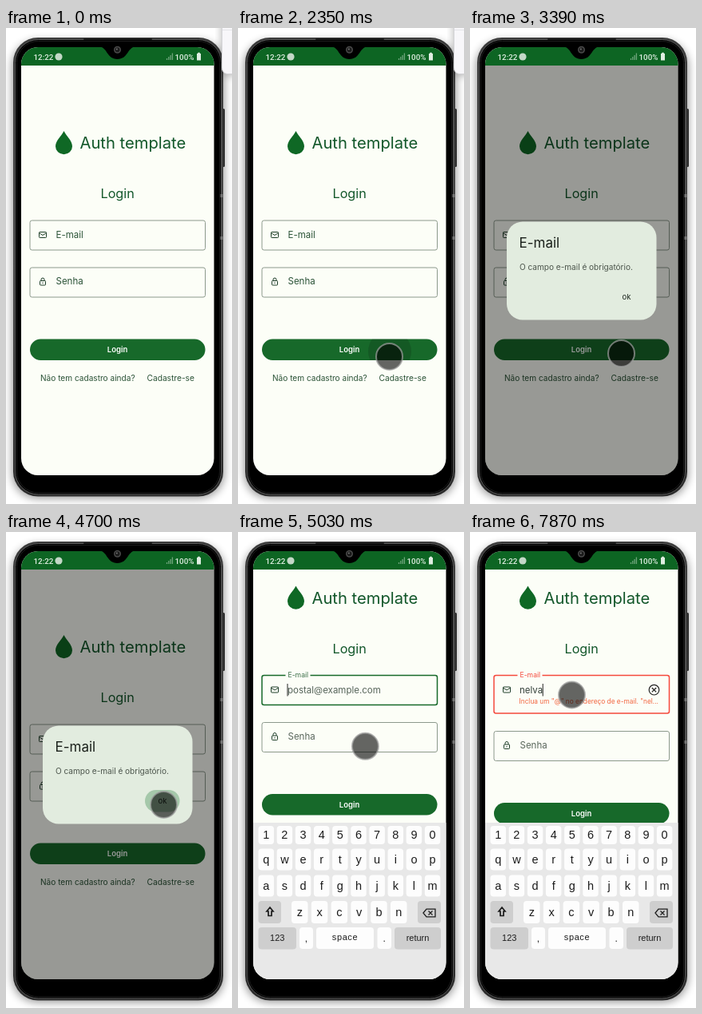
Recreate the animation shown at these times as an HTML page. Size 283 px wide and 596 px high, loop 8 s.

```html
<!DOCTYPE html>
<html lang="pt">
<head>
<meta charset="utf-8">
<title>Auth template</title>
<style>
html, body { margin: 0; width: 100%; height: 100%; overflow: hidden; background: #fff; }
svg { display: block; }
text { font-family: Inter, "Open Sans", sans-serif; fill: #2b5337; white-space: pre; }
.head { fill: #12572a; }
.bar text { font-family: Roboto, sans-serif; font-size: 9.8px; font-weight: 500; fill: #e2f0e5; }
#keys text { font-family: "Liberation Sans", Arial, sans-serif; fill: #1c1c1c; text-anchor: middle; }
.box { fill: none; stroke: #8c998c; }
.line { fill: none; stroke: #1f3f2a; }
</style>
</head>
<body>
<svg width="283" height="596" viewBox="0 0 283 596">
  <defs>
    <clipPath id="screen"><rect x="19" y="24" width="241.500" height="536" rx="21"/></clipPath>
    <clipPath id="pill"><rect x="30" y="389.500" width="219.500" height="26.500" rx="13.250"/></clipPath>
    <filter id="blur" x="-20%" y="-20%" width="140%" height="140%"><feGaussianBlur stdDeviation="5.500"/></filter>
    <linearGradient id="metal" x2="0" y2="1">
      <stop offset="0" stop-color="#3a3a3a"/><stop offset=".5" stop-color="#4a4a4a"/><stop offset="1" stop-color="#2a2a2a"/>
    </linearGradient>
  </defs>

  <!-- phone body -->
  <rect x="7.500" y="16" width="266" height="573" rx="32" fill="#000" opacity=".4" filter="url(#blur)"/>
  <rect x="270" y="101" width="4" height="73" rx="1.500" fill="#2c2c2c"/>
  <rect x="9" y="12" width="263" height="574.500" rx="31" fill="url(#metal)"/>
  <rect x="11.500" y="14.500" width="258" height="569.500" rx="29" fill="#000" stroke="#666" stroke-width=".8"/>
  <rect x="13.500" y="16.500" width="254" height="565.500" rx="27" fill="#000" stroke="#1d1d1d"/>
  <rect x="97" y="13" width="86" height="2" rx="1" fill="#1a1a1a"/>
  <path d="M270 208v4M270 261v4" stroke="#777" stroke-width="3"/>

  <g clip-path="url(#screen)">
    <rect x="19" y="24" width="242" height="536" fill="#fcfef7"/>
    <g id="page">
      <path d="M72.500 129C76 136 83 141 83 148.300A10.500 9.900 0 0 1 62 148.300C62 141 69 136 72.500 129Z" fill="#0f6825"/>
      <text class="head" x="92.500" y="151" font-size="20.200">Auth template</text>
      <text class="head" x="118.500" y="213" font-size="16.200">Login</text>

      <rect id="email" class="box" x="30" y="241" width="219.500" height="37" rx="2.500"/>
      <g class="line"><rect x="41.500" y="255.500" width="9" height="7" rx=".8"/><path d="M41.500 256.500l4.500 3 4.500-3"/></g>
      <rect id="gap" x="59.500" y="239" width="31" height="4" fill="#fcfef7"/>
      <text id="label" x="62.500">E-mail</text>
      <text id="hint" x="62" y="263" font-size="11.500" style="fill:#56645a">postal@example.com</text>
      <text id="typed" x="62" y="263" font-size="11.500" style="fill:#33403a"></text>
      <rect id="caret" y="251.500" width="1" height="15.500" fill="#222"/>
      <text id="error" x="61.500" y="276" font-size="8.300" style="fill:#f2643f">Inclua um "@" no endereço de e-mail. "nel...</text>
      <g id="clear" fill="none" stroke="#222" stroke-width="1.200">
        <circle cx="230.500" cy="259.200" r="6.300"/><path d="M227.800 256.500l5.400 5.400M233.200 256.500l-5.400 5.400"/>
      </g>

      <g id="lower">
        <rect class="box" x="30" y="300" width="219.500" height="37" rx="2.500"/>
        <g class="line"><rect x="42.500" y="316.500" width="7" height="5.500" rx=".8"/><path d="M44 316.500v-1.500a2 2 0 0 1 4 0v1.500M46 318.500v1.500"/></g>
        <text id="senha" x="62.500" y="321" font-size="11.500">Senha</text>
        <g clip-path="url(#pill)">
          <rect x="30" y="389" width="220" height="28" fill="#17692a"/>
          <circle id="ripple" cx="190" cy="405" fill="#000"/>
        </g>
        <text x="139.500" y="406" font-size="9.500" font-weight="600" text-anchor="middle" style="fill:#fff">Login</text>
        <text x="43" y="442" font-size="10.100">Não tem cadastro ainda?</text>
        <text x="176.500" y="442" font-size="10.200">Cadastre-se</text>
      </g>
    </g>

    <g id="keys"><rect x="19" y="364" width="242" height="196" fill="#e8e8e8"/></g>

    <rect id="dim" x="19" y="47" width="242" height="513" fill="#000"/>
    <g id="dialog">
      <rect x="46" y="242.500" width="187.500" height="123" rx="20" fill="#e2ecdf"/>
      <text x="61.500" y="275" font-size="17" style="fill:#1b211b">E-mail</text>
      <text x="62" y="303" font-size="10.050" style="fill:#4c554c">O campo e-mail é obrigatório.</text>
      <rect id="press" x="174" y="323" width="43.500" height="27.500" rx="13.700" fill="#a5c8aa"/>
      <text x="190.500" y="339.500" font-size="9.600" style="fill:#1e2a20">ok</text>
    </g>

    <g class="bar">
      <rect x="19" y="24" width="242" height="23" fill="#0d6523"/>
      <text x="34.500" y="40">12:22</text>
      <circle cx="66" cy="36" r="4.600" fill="#c3d8c7"/>
      <path d="M201.500 40v-2M203.800 40v-4M206.100 40v-6M208.400 40v-8.500" stroke="#6fa57c" stroke-width="1.300"/>
      <text x="211.500" y="40">100%</text>
      <path d="M239 32h1.200v-1.200h2.600V32H244v8.500h-5Z" fill="#dfeee2"/>
    </g>
  </g>

  <path d="M117 23.500C127 24 126 39 139.500 39S152 24 162 23.500Z" fill="#000"/>
  <circle cx="139.500" cy="27.300" r="4.500" fill="#4b4b4b"/>
  <circle cx="139.500" cy="27.300" r="3" fill="#1b1b1b"/>
  <circle cx="138.800" cy="26.500" r="1" fill="#777"/>

  <g id="panel">
    <rect x="270" y="-20" width="40" height="79" rx="8" fill="#000" opacity=".3" filter="url(#blur)"/>
    <rect x="270.500" y="-20" width="40" height="77.500" rx="7" fill="#f8f7fa" stroke="#d3d3d6"/>
    <path d="M271 2.500h12" stroke="#e4e4e8"/>
  </g>

  <circle id="touch" r="16.500" fill="#000" fill-opacity=".6" stroke="#a0a0a0" stroke-opacity=".7" stroke-width="2"/>
</svg>
<script>
const LOOP = 8000;
const NS = "http://www.w3.org/2000/svg";
const $ = id => document.getElementById(id);
const set = (id, attrs) => { for (const k in attrs) $(id).setAttribute(k, attrs[k]); };
const show = (id, on) => set(id, { opacity: +on });
const mix = (a, b, p) => a + (b - a) * p;

// Each row is [time, value, ...]; values are linear between rows.
function at(rows, t) {
  const i = rows.findIndex(r => r[0] > t);
  if (i < 0) return rows[rows.length - 1].slice(1);
  if (i === 0) return rows[0].slice(1);
  const a = rows[i - 1], b = rows[i];
  const p = (t - a[0]) / (b[0] - a[0]);
  return a.slice(1).map((v, k) => mix(v, b[k + 1], p));
}

const path = [
  [970, 235, 401], [1230, 170, 330], [1440, 133.5, 284.5], [1570, 95, 242], [1700, 127, 260],
  [1950, 127, 260], [2080, 150, 330], [2220, 182, 416], [2350, 189.5, 411.5], [2470, 189.5, 407.5],
  [3590, 189.5, 407.5], [3790, 160, 423], [3920, 145, 405], [4100, 168, 368], [4300, 197.5, 341.5],
  [4770, 197.5, 341.5], [5030, 159.5, 268.5], [5290, 128, 205], [5420, 127.5, 204]
];
const modal = [[2720, 0], [2860, .3], [3030, .3], [3390, 1], [4730, 1], [4900, .2], [5030, 0]];
const lift = [[4830, 0], [5000, 1]];
const grow = [[5980, 0], [6130, .15], [6400, 1]];
const ripple = [[2280, 0, .15], [2350, 27, .15], [2720, 27, .15], [2860, 27, 0]];
const press = [[4560, 0], [4640, 1]];
const typing = [[5850, 1], [5980, 2], [6130, 3], [6400, 4], [6820, 5]];
const word = "nelva";

function add(tag, attrs, label = "") {
  const el = document.createElementNS(NS, tag);
  for (const k in attrs) el.setAttribute(k, attrs[k]);
  el.textContent = label;
  $("keys").append(el);
}

function key(x, y, w, h, label, size, dark) {
  add("rect", { x, y, width: w, height: h, rx: 4, fill: dark ? "#cecece" : "#fdfdfd" });
  add("text", { x: x + w / 2, y: y + h / 2 + size * .34, "font-size": size }, label);
}

function buildKeys() {
  [["1234567890", 368, 23], ["qwertyuiop", 396.5, 27], ["asdfghjklm", 429.5, 27]].forEach(([row, y, h]) =>
    [...row].forEach((c, i) => key(25.5 + i * 23.15, y, 19.5, h, c, 14.5)));
  [..."zxcvbn"].forEach((c, i) => key(67 + i * 24.8, 462, 20.5, 28, c, 14.5));
  key(25.5, 462, 28.5, 28, "", 14, true);
  key(225, 462, 29, 28, "", 14, true);
  key(25.5, 495, 47.5, 27.5, "123", 11, true);
  key(77, 495, 17, 27, ",", 12);
  key(98, 495, 72, 27, "", 11);
  add("text", { x: 134, y: 510.5, "font-size": 11, "letter-spacing": .6 }, "space");
  key(174.5, 495, 17.5, 27, ".", 12);
  key(196, 495, 58, 27.5, "return", 11, true);
  const icon = { fill: "none", stroke: "#1c1c1c" };
  add("path", { ...icon, "stroke-width": 1.7, d: "M40 470l4 5h-2v5.500h-4v-5.500h-2Z" });
  add("path", { ...icon, "stroke-width": 1.3, d: "M232 477l4-4.800h11v9.600h-11ZM238.500 474.500l5 5M243.500 474.500l-5 5" });
}

function draw(t) {
  const [x, y] = at(path, t);
  set("touch", { cx: x, cy: y });
  show("touch", t >= 970);
  show("panel", t < 2720);

  const [m] = at(modal, t);
  set("dim", { opacity: m * .4 });
  set("dialog", { opacity: m });
  set("press", { opacity: at(press, t)[0] });
  const [r, ro] = at(ripple, t);
  set("ripple", { r, opacity: ro });

  const [up] = at(lift, t), [g] = at(grow, t);
  set("page", { transform: `translate(0 ${-61.5 * up})` });
  set("lower", { transform: `translate(0 ${11 * g})` });
  set("keys", { transform: `translate(0 ${196 * (1 - up)})` });

  const bad = t >= 6130, focus = up > 0;
  const tone = bad ? "#f5483c" : "#17692a";
  $("email").style.stroke = focus ? tone : "";
  set("email", { height: 37 + 10.5 * g, "stroke-width": focus ? 1.5 : 1 });
  set("gap", { opacity: up });
  set("label", { y: mix(263, 243.5, up), "font-size": mix(11.5, 8.6, up) });
  $("label").style.fill = bad ? tone : focus ? "#3d6f49" : "";
  $("senha").style.fill = focus ? "#5a675c" : "";

  const step = typing.filter(k => k[0] <= t).pop();
  const n = step ? step[1] : 0;
  $("typed").textContent = word.slice(0, n);
  show("hint", up === 1 && !n);
  show("clear", n > 0);
  show("error", t >= 5980);
  set("caret", { x: 61.5 + (n ? $("typed").getComputedTextLength() : 0) });
  show("caret", up === 1 && !(t >= 7310 && t < 7870));
}

buildKeys();
const start = performance.now();
function tick() {
  draw((performance.now() - start) % LOOP);
  requestAnimationFrame(tick);
}
tick();
</script>
</body>
</html>
```
